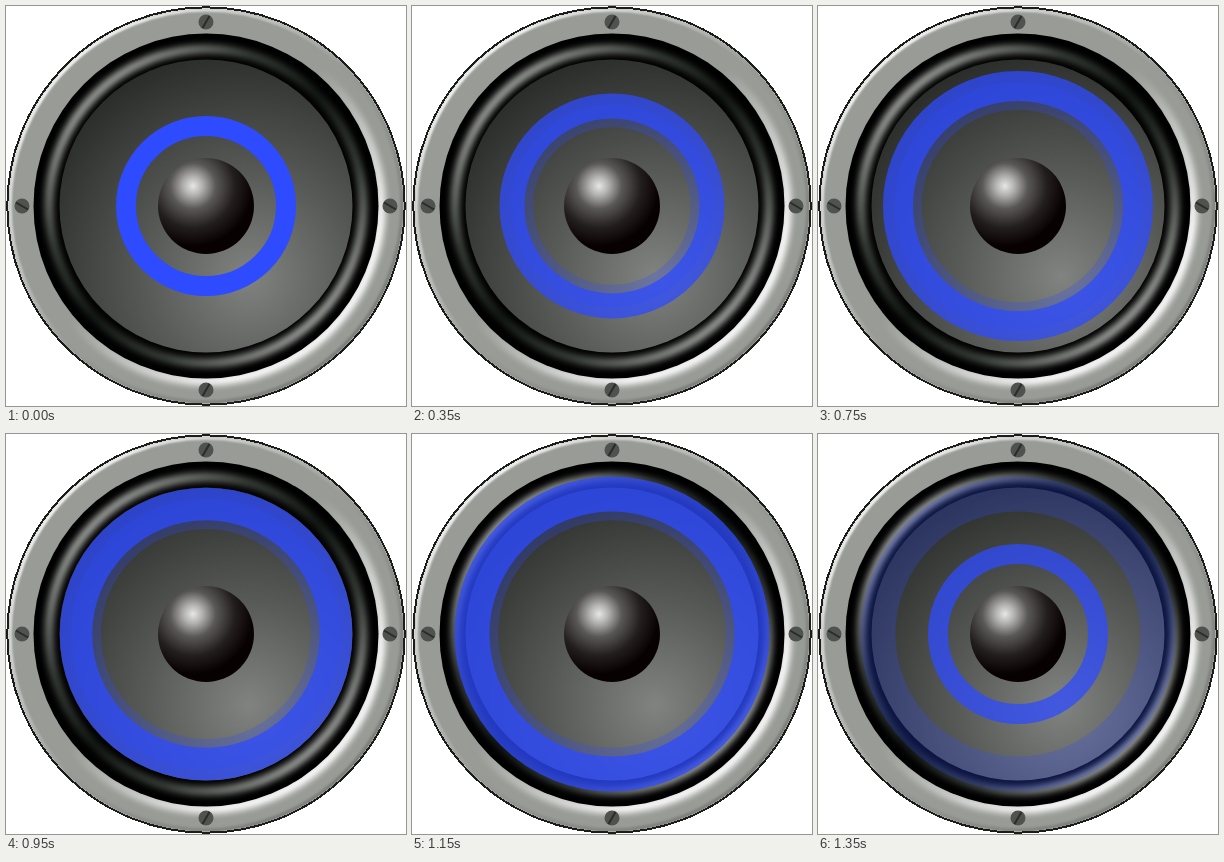
These frames come from a looping animation (400 by 400 pixels, 1400 ms). An HTML page:

```html
<!DOCTYPE html>
<html lang="en">
<head>
<meta charset="utf-8">
<title>Pulsing speaker</title>
<style>
  html, body { margin: 0; width: 100%; height: 100%; overflow: hidden; background: #fff; }
  svg { display: block; width: 100vw; height: 100vh; }
</style>
</head>
<body>
<svg viewBox="0 0 400 400">
  <defs>
    <linearGradient id="outerBevel" x1=".15" y1=".15" x2=".85" y2=".85">
      <stop offset="0" stop-color="#fff"/>
      <stop offset=".5" stop-color="#989b96"/>
      <stop offset="1" stop-color="#777975"/>
    </linearGradient>
    <linearGradient id="innerGlow" x1=".15" y1=".15" x2=".85" y2=".85">
      <stop offset=".45" stop-color="#fff" stop-opacity="0"/>
      <stop offset=".9" stop-color="#fff"/>
    </linearGradient>
    <linearGradient id="sheen" gradientUnits="userSpaceOnUse" x1="89" y1="89" x2="311" y2="311">
      <stop offset="0" stop-color="#9a9d99"/>
      <stop offset=".25" stop-color="#3a3f3a"/>
      <stop offset=".5" stop-color="#141a15"/>
      <stop offset=".75" stop-color="#3a3f3a"/>
      <stop offset="1" stop-color="#9a9d99"/>
    </linearGradient>
    <radialGradient id="cone" gradientUnits="userSpaceOnUse" cx="243" cy="271" r="245">
      <stop offset="0" stop-color="#80837f"/>
      <stop offset=".42" stop-color="#585a57"/>
      <stop offset="1" stop-color="#252724"/>
    </radialGradient>
    <radialGradient id="dome" gradientUnits="userSpaceOnUse" cx="187" cy="180" r="60">
      <stop offset="0" stop-color="#e6e8e4"/>
      <stop offset=".15" stop-color="#b4b4b2"/>
      <stop offset=".38" stop-color="#5a5857"/>
      <stop offset=".7" stop-color="#231e1e"/>
      <stop offset="1" stop-color="#080101"/>
    </radialGradient>
    <filter id="soft" x="-10%" y="-10%" width="120%" height="120%" color-interpolation-filters="sRGB">
      <feGaussianBlur stdDeviation="3"/>
    </filter>
    <filter id="slightlySoft" x="-10%" y="-10%" width="120%" height="120%" color-interpolation-filters="sRGB">
      <feGaussianBlur stdDeviation="1"/>
    </filter>
    <g id="screw">
      <circle r="7.5" fill="#50524f"/>
      <path d="M-3.5 6 3.5-6" stroke="#2b2c2a" stroke-width="2"/>
    </g>
  </defs>

  <circle cx="200" cy="200" r="197.5" fill="#989b96"/>
  <g fill="none">
    <circle cx="200" cy="200" r="196" stroke="url(#outerBevel)" stroke-width="3" filter="url(#slightlySoft)"/>
    <circle cx="200" cy="200" r="175" stroke="url(#innerGlow)" stroke-width="9" filter="url(#soft)"/>
    <circle cx="200" cy="200" r="198.7" stroke="#1c1d1b" stroke-width="2" shape-rendering="crispEdges"/>
  </g>
  <circle cx="200" cy="200" r="172.5" fill="#000"/>
  <circle cx="200" cy="200" r="157" fill="none" stroke="url(#sheen)" stroke-width="9" filter="url(#soft)"/>
  <circle cx="200" cy="200" r="146.5" fill="url(#cone)"/>
  <circle cx="200" cy="200" r="48" fill="url(#dome)"/>
  <use href="#screw" transform="translate(200 16)"/>
  <use href="#screw" transform="translate(200 384)"/>
  <use href="#screw" transform="translate(16 200) rotate(90)"/>
  <use href="#screw" transform="translate(384 200) rotate(90)"/>

  <g fill="none" stroke="#2e4bff">
    <circle class="ring" cx="200" cy="200"/>
    <circle class="ring" cx="200" cy="200"/>
  </g>
</svg>
<script>
  const STEPS = 7, STEP_MS = 200, TICK_MS = 50;
  const [fading, rising] = document.querySelectorAll('.ring');

  function setRing(ring, step, opacity) {
    const scale = 1 + step / 8;
    ring.setAttribute('r', 80 * scale);
    ring.setAttribute('stroke-width', 20 * scale);
    ring.setAttribute('opacity', opacity);
  }

  // Each ring cross-fades into the next larger one; the last returns to the first.
  function draw(now) {
    const time = Math.floor(now / TICK_MS) * TICK_MS % (STEPS * STEP_MS);
    const step = Math.floor(time / STEP_MS);
    const mix = time / STEP_MS - step;
    setRing(fading, step, 1 - mix);
    setRing(rising, (step + 1) % STEPS, mix);
  }

  function loop() {
    draw(performance.now());
    requestAnimationFrame(loop);
  }
  loop();
</script>
</body>
</html>
```
